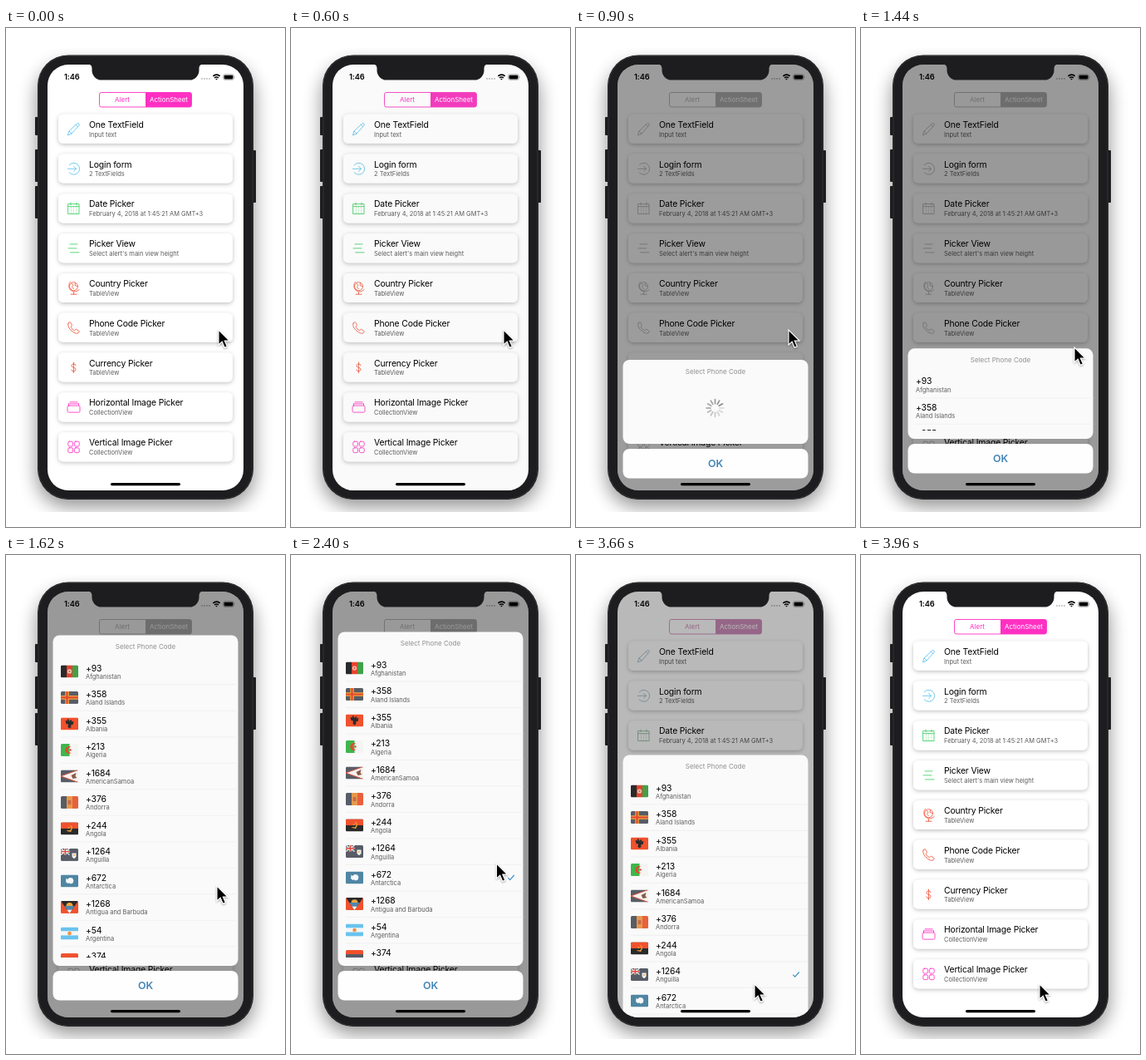
Write an HTML page that moves like this. It is 336 px wide and 600 px high and loops after 4080 ms.

```html
<!DOCTYPE html>
<html lang="en">
<head>
<meta charset="utf-8">
<title>Phone code picker</title>
<style>
html, body { margin: 0; width: 100%; height: 100%; overflow: hidden; background: #fff; }
svg { display: block; width: 336px; height: 600px; }
text { font-family: Inter, "Liberation Sans", sans-serif; }
.big { font-size: 10.4px; letter-spacing: -.15px; fill: #000; }
.small { font-size: 7.5px; fill: #5c5c5c; }
.mid { font-size: 8px; text-anchor: middle; }
.icon { fill: none; stroke: currentColor; stroke-width: .85; stroke-linecap: round; stroke-linejoin: round; }
</style>
</head>
<body>
<svg viewBox="0 0 336 600" xmlns="http://www.w3.org/2000/svg">
  <defs>
    <clipPath id="stage"><rect y="24" width="336" height="558"/></clipPath>
    <clipPath id="screen"><rect x="50" y="44" width="236" height="512" rx="25"/></clipPath>
    <clipPath id="table"><rect id="tableBox" x="56" width="224"/></clipPath>
    <clipPath id="flag"><rect x="-10.5" y="-7.5" width="21" height="15" rx="1.5"/></clipPath>
    <filter id="soft" x="-30%" y="-20%" width="160%" height="140%"><feGaussianBlur stdDeviation="11"/></filter>
    <filter id="lift" x="-10%" y="-40%" width="120%" height="200%">
      <feDropShadow dx="0" dy="1.5" stdDeviation="2.6" flood-opacity=".25"/>
    </filter>
    <filter id="tipShade" x="-50%" y="-30%" width="220%" height="180%">
      <feDropShadow dx="0" dy="1" stdDeviation=".9" flood-opacity=".4"/>
    </filter>
  </defs>

  <g clip-path="url(#stage)">
    <rect x="37" y="44" width="262" height="532" rx="38" opacity=".42" filter="url(#soft)"/>
  </g>
  <g fill="#1d1d1f">
    <rect x="35" y="107" width="5" height="22" rx="1"/>
    <rect x="35" y="146" width="5" height="39" rx="1"/>
    <rect x="35" y="190" width="5" height="39" rx="1"/>
    <rect x="296" y="147" width="5" height="63" rx="1"/>
    <rect x="38" y="32.5" width="260" height="534.5" rx="37"/>
  </g>
  <rect x="39" y="33.5" width="258" height="532.5" rx="36" fill="none" stroke="#333336"/>

  <g clip-path="url(#screen)">
    <rect x="50" y="44" width="236" height="512" fill="#fff"/>
    <g id="segment">
      <rect x="112.5" y="77.5" width="111" height="17.5" rx="2.5" fill="none" stroke="currentColor" stroke-width=".9"/>
      <path d="M168 77.5h53a2.5 2.5 0 0 1 2.5 2.5v12.5a2.5 2.5 0 0 1-2.5 2.5h-53z" fill="currentColor"/>
      <text class="mid" x="140" y="89.2" fill="currentColor">Alert</text>
      <text class="mid" x="196" y="89.2" fill="#fff">ActionSheet</text>
    </g>
    <g id="cards"></g>
    <text x="70" y="62.3" font-size="9.3" font-weight="600" letter-spacing="-.1">1:46</text>
    <g fill="#b5b5b5">
      <circle cx="236" cy="61" r=".9"/><circle cx="239" cy="61" r=".9"/>
      <circle cx="242" cy="61" r=".9"/><circle cx="245" cy="61" r=".9"/>
    </g>
    <g fill="none" stroke="#000" stroke-width="1.5">
      <path d="M249.3 57.9q4.2-3.6 8.4 0M251 60q2.5-2 5 0"/>
      <path d="M253.5 62.6l-1.3-1.3q1.3-1 2.6 0z" fill="#000" stroke="none"/>
    </g>
    <rect x="261.7" y="55.9" width="12.6" height="6.4" rx="1.8" fill="none" stroke="#777" stroke-width=".6"/>
    <rect x="262.6" y="56.8" width="10.8" height="4.6" rx="1.1"/>
    <path d="M275 58v2.2q.9-1.1 0-2.2" fill="#777"/>
    <rect id="dim" x="50" y="44" width="236" height="512"/>

    <g id="sheet">
      <rect id="panel" x="56.5" width="223" rx="8" fill="#fafafa"/>
      <text id="heading" class="mid" x="168" fill="#8f8f8f">Select Phone Code</text>
      <g id="spinner"></g>
      <g clip-path="url(#table)"><g id="rows"></g></g>
      <rect x="56.5" y="500" width="223" height="35.5" rx="8" fill="#fefefe"/>
      <text x="168" y="522.2" text-anchor="middle" font-size="12.4" font-weight="600" fill="#4285b4">OK</text>
    </g>
    <rect x="126" y="547" width="84" height="3.2" rx="1.6"/>
  </g>
  <path d="M99 43.5q4.500 .5 4.500 5v2.500a11.500 11.500 0 0 0 11.500 11.500h106a11.500 11.500 0 0 0 11.500-11.500v-2.500q0-4.500 4.500-5z" fill="#1d1d1f"/>
  <path id="cursor" d="M0 0V18L4.200 14.200L7.200 21.200L10.300 19.900L7.300 13H13Z" stroke="#fff" stroke-width="1.100" filter="url(#tipShade)"/>
</svg>

<script>
const LOOP = 4080, PITCH = 31.5, TOP_SHORT = 393, TOP_TALL = 92.5, BOTTOM = 494;
const $ = id => document.getElementById(id);
const set = (id, name, value) => $(id).setAttribute(name, value);

const BLUE = [88, 194, 240], GREEN = [62, 208, 98], RED = [242, 86, 60], PINK = [255, 48, 194];
const dots = [-3, 0, 3].map(y => [-3, 0, 3].map(x => `M${x} ${y + 2}h.1`).join('')).join('');

// title, subtitle, tint, icon path around 0,0
const cards = [
  ['One TextField', 'Input text', BLUE, 'M-7 7l1.500-4.500L4-6.500q1.300-1 2.300 0t0 2.300L-2.500 5.500zM-5.500 2.500l3 3M2.700-5.300l2.500 2.500'],
  ['Login form', '2 TextFields', BLUE, 'M-5.300-4.500A7 7 0 1 1-5.300 4.500M-7 0H3M0-3l3 3-3 3'],
  ['Date Picker', 'February 4, 2018 at 1:45:21 AM GMT+3', GREEN, 'M-6.500-5.500h13v12h-13zM-6.500-2.500h13M-3.500-7v2.500M3.500-7v2.500' + dots],
  ['Picker View', "Select alert's main view height", GREEN, 'M-4.500-5h9M-6.500 0h10M-4 5h10.500'],
  ['Country Picker', 'TableView', RED, 'M5-2a5 5 0 1 1-10 0a5 5 0 1 1 10 0M-4-7.500A7 7 0 1 0 6.500 2M0 5v2.500M-3.500 7.500h7M-2.500-5.500l2 2-1.500 2.500 2 2M2-6l-.5 2.500 2.500 1.500'],
  ['Phone Code Picker', 'TableView', RED, 'M-6.500-5.500l2-1.500q1 0 2.500 4l-1.500 1.700q1 3 4.500 4.500l1.800-1.500q3.700 1.500 4 2.800l-1.500 2q-2 1.300-6-1.500T-6-.5q-1.300-3-.5-5z'],
  ['Currency Picker', 'TableView', RED, 'M2.500-2.500q-.3-2-2.500-2t-2.500 2T0 0t2.500 2.300T0 4.500t-2.500-2M0-6.300V6.300'],
  ['Horizontal Image Picker', 'CollectionView', PINK, 'M-6-2h12q1.500 0 1.500 1.500v5q0 1.500-1.500 1.500H-6q-1.500 0-1.500-1.500v-5q0-1.500 1.500-1.500zM-6-4.200H6M-4.500-6.300h9M-6-4.200v2M6-4.200v2'],
  ['Vertical Image Picker', 'CollectionView', PINK, [[-6.7, -6.700], [.9, -6.700], [-6.7, .9], [.9, .9]].map(([x, y]) =>
    `M${x + 1.5} ${y}h2.800q1.500 0 1.500 1.500v2.800q0 1.500-1.500 1.500h-2.800q-1.500 0-1.500-1.500v-2.800q0-1.500 1.500-1.500z`).join('')]
];
$('cards').innerHTML = cards.map(([title, sub, , icon], i) => `
  <g transform="translate(0 ${121.5 + i * 47.8})">
    <rect x="63" y="-17.700" width="210" height="35" rx="6" fill="#fff" filter="url(#lift)"/>
    <path class="icon tint" transform="translate(81.500 0)" d="${icon}"/>
    <text class="big" x="100" y="-1.800">${title}</text>
    <text class="small" x="100" y="9.200">${sub}</text>
  </g>`).join('');

// flag helpers in a 21 x 15 box centred on 0,0
const box = (x, y, w, h, c) => `<rect x="${x}" y="${y}" width="${w}" height="${h}" fill="${c}"/>`;
const disc = (x, y, r, c) => `<circle cx="${x}" cy="${y}" r="${r}" fill="${c}"/>`;
const shape = (d, c) => `<path d="${d}" fill="${c}"/>`;
const line = (d, c, w) => `<path d="${d}" fill="none" stroke="${c}" stroke-width="${w}"/>`;
const full = c => box(-10.5, -7.5, 21, 15, c);
const across = cs => cs.map((c, i) => box(-10.5 + i * 7, -7.5, 7.1, 15, c)).join('');
const down = cs => cs.map((c, i) => box(-10.5, -7.5 + i * 5, 21, 5.1, c)).join('');
const SLATE = '#575c66', FIRE = '#f1512d', INK = '#2b2a2b', GOLD = '#f0a63c';

const codes = [
  ['+93', 'Afghanistan', across([INK, '#e2452f', '#43a047']) + disc(0, 0, 2.6, '#f0c9b8') + disc(0, 0, 1.2, '#d7684f')],
  ['+358', 'Aland Islands', full(SLATE) + line('M-10.500 0h21M-3-7.500v15', GOLD, 4.6) + line('M-10.500 0h21M-3-7.500v15', '#e5482f', 2.2)],
  ['+355', 'Albania', full(FIRE) + shape('M0-3l1.500-2 1.500 1-1 1.500 3-.5-1 4-2.500.5L2 4 0 5.500-2 4l.5-3.500L-4 0l-1-4 3 .5-1-1.500 1.500-1z', INK)],
  ['+213', 'Algeria', full('#f4f4f2') + box(-10.5, -7.5, 10.5, 15, '#3fb64c') + shape('M2-3.300a4.300 4.300 0 1 0 0 6.600a3.400 3.400 0 1 1 0-6.600z', '#e8452f') + disc(1, 0, 1.2, '#e8452f')],
  ['+1684', 'AmericanSamoa', full(SLATE) + shape('M-10.500 0L10.500-7.500v15z', '#f5f2ef') + line('M10.500-7.500L-10.500 0 10.500 7.500', '#d9523f', 1) + shape('M2-1l6-3-1 4 2 2-5 1z', '#8a5a44')],
  ['+376', 'Andorra', across([SLATE, '#e59a4c', '#e8603c']) + box(-1.8, -2.5, 3.6, 5, '#c9694a')],
  ['+244', 'Angola', full(INK) + box(-10.5, -7.5, 21, 7.5, FIRE) + line('M1-3.500a3.500 3.500 0 0 1-1.500 6.500M-3 2.500l5 1', GOLD, 1.2) + disc(-1, -1, 1, GOLD)],
  ['+1264', 'Anguilla', full(SLATE) + line('M-10.500-7.500L0 0M0-7.500L-10.500 0', '#eee', 1.3) + line('M-10.500-3.800H0M-5.200-7.500V0', '#f3eeee', 2.6) + line('M-10.500-3.800H0M-5.200-7.500V0', '#e0483a', 1.4) + shape('M3-2h5v4q-1 2-2.500 2.500Q4 4 3 2z', '#f2f2f2') + disc(5.5, 0.4, 1, GOLD)],
  ['+672', 'Antarctica', full('#4f86a3') + shape('M-4-3.500l1.500 1.500 2.500-2 3.500.5 1.500 3-1 3-3 1-1.500-1.200L-2 3-4.500 1z', '#f6f8f9')],
  ['+1268', 'Antigua and Barbuda', full(FIRE) + shape('M-10.500-7.500h21L0 7.500z', INK) + shape('M-6.300-1.500h12.600L3 3H-3z', '#4f86b0') + shape('M-3.200 3h6.400L0 7.500z', '#f5f5f5') + shape('M-4-1.500a4 3.800 0 0 1 8 0z', GOLD)],
  ['+54', 'Argentina', down(['#69c3ee', '#f6f6f6', '#69c3ee']) + disc(0, 0, 2.3, '#f0924a')],
  ['+374', 'Armenia', down([FIRE, SLATE, GOLD])]
];
$('rows').innerHTML = codes.map(([code, name, flag], i) => `
  <g transform="translate(0 ${43.5 + i * PITCH})">
    <g class="flag" transform="translate(76.500 0)" clip-path="url(#flag)">${flag}</g>
    <g class="label"><text class="big" y="-.4">${code}</text><text class="small" y="9">${name}</text></g>
    <path d="M66 15.900H280" stroke="#e9e9e9" stroke-width=".6"/>
  </g>`).join('') +
  '<path id="check" d="M261.300 .2l2.400 2.500 5-5.700" fill="none" stroke="#3f8fc9" stroke-width="1.200"/>';

$('spinner').innerHTML = Array.from({ length: 12 }, (_, i) =>
  `<path d="M0-5.500V-10.300" transform="rotate(${i * 30})" stroke="#777" stroke-width="1.800" stroke-linecap="round" opacity="${.2 + .6 * i / 11}"/>`).join('');

// keys are [time, value]; step holds a value, track blends to the next
const step = (t, keys) => keys.filter(k => k[0] <= t).pop()[1];
function track(t, keys) {
  const n = keys.findIndex(k => k[0] > t);
  if (n < 0) return keys[keys.length - 1][1];
  if (n === 0) return keys[0][1];
  const [a, b] = [keys[n - 1], keys[n]];
  return a[1] + (b[1] - a[1]) * (t - a[0]) / (b[0] - a[0]);
}
const ease = u => u < .5 ? 4 * u ** 3 : 1 - 4 * (1 - u) ** 3;
const ramp = (t, a, b) => ease(Math.min(1, Math.max(0, (t - a) / (b - a))));

function cursorAt(t) {
  if (t >= 2760) {
    const u = ramp(t, 2760, 3240);
    return [245.5 - 30.5 * u, 361 + 155 * u];
  }
  return [
    track(t, [[1320, 256], [1440, 257], [1620, 254], [1740, 251], [1980, 249.5], [2340, 249.5], [2400, 247.5], [2580, 245.5]]),
    track(t, [[1320, 363], [1440, 384], [1620, 398], [1740, 405], [1800, 405], [1980, 389], [2340, 389], [2400, 371], [2580, 361]])
  ];
}

function draw(now) {
  const t = Math.floor(now % LOOP / 60) * 60;
  const leave = ramp(t, 3480, 3900);
  const shown = 1 - leave;
  const slide = step(t, [[0, 170], [600, 161], [780, 34], [900, 6], [960, 2], [1020, 0]]) + leave * 470;
  const dim = step(t, [[0, 0], [600, .02], [780, .34], [900, .39], [960, .4]]) * shown;
  const grey = step(t, [[0, 0], [600, .1], [780, .82], [900, 1]]) * shown;
  const top = TOP_SHORT + (TOP_TALL - TOP_SHORT) * ramp(t, 1390, 1660);
  const hasFlags = t >= 1500;

  const tint = c => `rgb(${c.map(v => Math.round(v + (182 - v) * grey))})`;
  $('segment').style.color = tint(PINK);
  document.querySelectorAll('.tint').forEach((el, i) => { el.style.color = tint(cards[i][2]); });
  set('dim', 'opacity', dim);

  set('sheet', 'transform', `translate(0 ${slide})`);
  set('panel', 'y', top);
  set('panel', 'height', BOTTOM - top);
  set('heading', 'y', top + 16.9);
  set('tableBox', 'y', top + 26);
  set('tableBox', 'height', 484 - top - 26);

  set('spinner', 'transform', `translate(167.5 ${top + 58}) rotate(${t / 60 * 30})`);
  set('spinner', 'opacity', step(t, [[0, 1], [1320, .4], [1380, 0]]));
  set('rows', 'transform', `translate(0 ${top})`);
  set('rows', 'opacity', step(t, [[0, 0], [1320, .4], [1380, .9], [1440, 1]]));
  document.querySelectorAll('.flag').forEach(el => el.setAttribute('opacity', hasFlags ? 1 : 0));
  document.querySelectorAll('.label').forEach(el => el.setAttribute('transform', `translate(${hasFlags ? 96 : 66} 0)`));

  const picked = t < 2760 ? 8 : 7;
  set('check', 'transform', `translate(0 ${43.5 + picked * PITCH})`);
  set('check', 'opacity', t < 2220 ? 0 : 1);
  set('cursor', 'transform', `translate(${cursorAt(t).join(' ')})`);
}

const start = performance.now();
function tick() {
  draw(performance.now() - start);
  requestAnimationFrame(tick);
}
tick();
</script>
</body>
</html>
```
